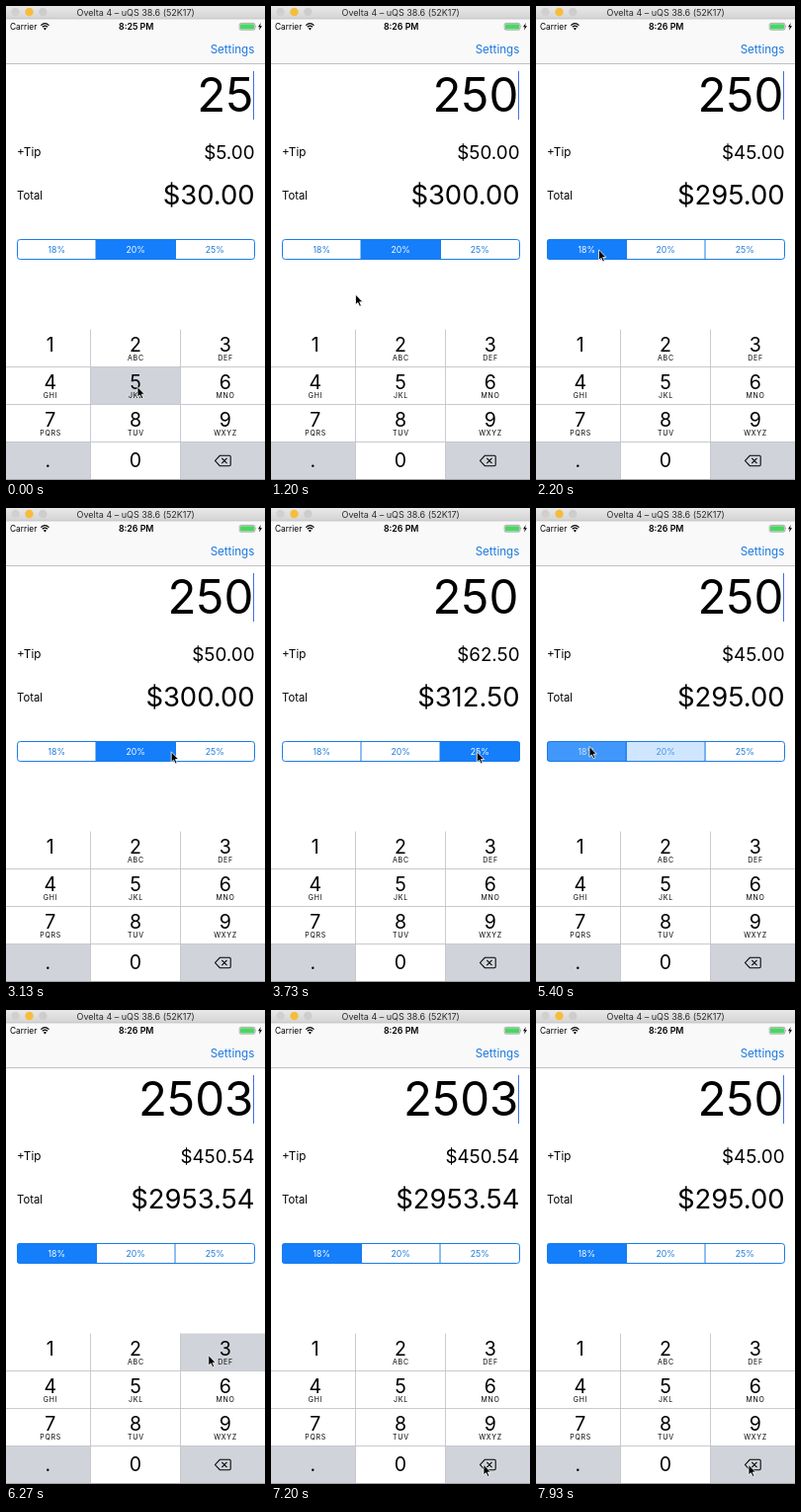
Recreate the animation shown at these times as an HTML page. Size 262 by 480 pixels, loop 8000 ms.

```html
<!DOCTYPE html>
<html lang="en">
<head>
<meta charset="utf-8">
<title>Tip calculator</title>
<style>
  html, body { margin: 0; width: 100%; height: 100%; overflow: hidden; background: #fff; }
  svg { display: block; width: 100vw; height: 100vh; font-family: Inter, "Open Sans", sans-serif; }
  .blue { fill: #1a78dc; }
  .mid { text-anchor: middle; }
  .end { text-anchor: end; }
  .digit { font-size: 19.5px; }
  .letters { font-size: 7px; letter-spacing: .75px; }
  .segment { font-size: 8.7px; }
  .rule { stroke: #c2c5ca; stroke-width: .9; fill: none; }
</style>
</head>
<body>
<svg id="stage" viewBox="0 0 262 480">
  <defs>
    <linearGradient id="chrome" x2="0" y2="1">
      <stop stop-color="#e9e9e9"/><stop offset="1" stop-color="#d3d3d3"/>
    </linearGradient>
    <clipPath id="pill"><rect x="11" y="236" width="241" height="21" rx="3.2"/></clipPath>
  </defs>
  <rect width="262" height="480" fill="#fff"/>

  <!-- window bar -->
  <rect y="13" width="262" height="45" fill="#f9f9fa"/>
  <path d="M0 58.5H262" stroke="#b9b9bb" stroke-width=".9"/>
  <rect width="262" height="13" fill="url(#chrome)"/>
  <path d="M0 13H262" stroke="#bcbcbc" stroke-width=".7"/>
  <circle cx="9.5" cy="6" r="4.2" fill="#d2cfcf"/>
  <circle cx="23.5" cy="6" r="4.2" fill="#f6bd3b"/>
  <circle cx="37.3" cy="6" r="4.2" fill="#cdcdcd"/>
  <text class="mid" x="131.2" y="9.6" font-size="9" fill="#2a2a2a">Ovelta 4 – uQS 38.6 (52K17)</text>

  <!-- status bar -->
  <text x="4" y="23.8" font-size="8.4">Carrier</text>
  <g fill="none" stroke="#000" stroke-width="1.2">
    <path d="M35.3 19.6Q39.4 15.8 43.5 19.6M36.8 21.3Q39.4 18.9 42 21.3"/>
  </g>
  <path d="M37.9 22.7Q39.4 21.3 40.9 22.7L39.4 24.4Z"/>
  <text id="clock" class="mid" x="131.7" y="24" font-size="8.8" font-weight="600"></text>
  <rect x="236.2" y="17.4" width="15.6" height="6.8" rx="1.4" fill="none" stroke="#777" stroke-width=".6"/>
  <rect x="237" y="18.2" width="14" height="5.2" rx=".7" fill="#4cd564"/>
  <path d="M252.6 19.6Q253.8 20.8 252.6 22Z" fill="#777"/>
  <path d="M257.8 17L255 21.3H256.8L256 24.6L259 20.2H257.1Z"/>
  <text class="blue end" x="251.3" y="47.6" font-size="11.6">Settings</text>

  <!-- bill -->
  <text id="amount" class="end" x="250.3" y="107" font-size="47.4"></text>
  <rect id="caret" x="250" y="66" width="1" height="49" fill="#3f6fe0"/>
  <text x="11" y="152.1" font-size="11.7">+Tip</text>
  <text id="tip" class="end" x="251.5" y="154.7" font-size="18.8"></text>
  <text x="11" y="195.6" font-size="11.3">Total</text>
  <text id="total" class="end" x="251.5" y="201.3" font-size="27.4"></text>

  <g id="segments"></g>
  <g id="keypad"></g>
  <path d="M0 479.5H262" stroke="#a6a6a6"/>

  <path id="pointer" d="M0 0V10.6L2.4 8.4L4.1 12.2L5.9 11.4L4.2 7.7H7.4Z" stroke="#fff" stroke-width=".8"/>
</svg>
<script>
const LOOP = 8000, FADE = 250, KEY_H = 38, KEY_TOP = 327.5;
const RATES = [18, 20, 25];
const $ = id => document.getElementById(id);

// [start, value]: each value holds until the next start
const amounts = [[0, 25], [680, 250], [6130, 2503], [7420, 250]];
const picks = [[-1000, 1], [1790, 0], [2800, 1], [3440, 2], [4440, 1], [5200, 0]];
const presses = [[0, 110, '5'], [680, 830, '0'], [6130, 6400, '3'], [7420, 7560, 'del']];
// [time, x, y]
const route = [
  [0, 133, 385.5], [150, 133, 385.5], [560, 130.5, 455], [900, 130.5, 455],
  [1200, 85.5, 292], [1320, 85.5, 292], [1650, 63.5, 246.8], [2350, 63.5, 246.8],
  [2700, 131.5, 246.8], [2950, 131.5, 246.8], [3330, 208.3, 246.8], [3900, 208.3, 246.8],
  [4300, 131.5, 244], [4700, 131.5, 244], [5080, 54, 241.5], [5520, 54, 241.5],
  [6050, 204.8, 349.5], [6480, 204.8, 349.5], [7100, 215, 460.3], [LOOP, 215, 460.3]
];

function buildSegments() {
  const x = i => 11 + 80 * i;
  const label = (i, fill) =>
    `<text class="segment mid" x="${x(i) + 40.2}" y="249.9" fill="${fill}">${RATES[i]}%</text>`;
  const cell = i => `${label(i, '#1a78dc')}<g id="seg${i}" clip-path="url(#pill)">
    <rect x="${x(i)}" y="236" width="81" height="21" fill="#147efb"/>${label(i, '#fff')}</g>`;
  $('segments').innerHTML = RATES.map((_, i) => cell(i)).join('') +
    `<g fill="none" stroke="#1a7ce8">
      <rect x="11.5" y="236.5" width="240" height="20" rx="2.8"/>
      <path d="M91 236.5V256.5M171 236.5V256.5"/></g>`;
}

function buildKeypad() {
  const names = ['1', '2', '3', '4', '5', '6', '7', '8', '9', '.', '0', 'del'];
  const letters = ['', 'ABC', 'DEF', 'GHI', 'JKL', 'MNO', 'PQRS', 'TUV', 'WXYZ', '', '', ''];
  const edges = [0, 85.5, 176.5, 262], centers = [44.7, 131, 221.7];
  let html = '';
  names.forEach((name, i) => {
    const col = i % 3, top = KEY_TOP + KEY_H * Math.floor(i / 3), cx = centers[col];
    html += `<rect id="key-${name}" x="${edges[col]}" y="${top}"
      width="${edges[col + 1] - edges[col]}" height="${KEY_H}"/>`;
    if (name === 'del') {
      html += `<g fill="none" stroke="#000" stroke-width="1.05">
        <path d="M216.3 455.3H226Q227.2 455.3 227.2 456.5V464.5Q227.2 465.7 226 465.7H216.3L211.5 460.5Z"/>
        <path d="M218.3 457.8L223.5 463.2M223.5 457.8L218.3 463.2"/></g>`;
    } else {
      const x = name === '.' ? 42.3 : cx, y = top + (letters[i] || name === '1' ? 22 : 25.7);
      html += `<text class="digit mid" x="${x}" y="${y}">${name}</text>
        <text class="letters mid" x="${cx + .4}" y="${top + 31.7}">${letters[i]}</text>`;
    }
  });
  const rows = [1, 2, 3].map(n => `M0 ${KEY_TOP + KEY_H * n}H262`).join('');
  const columns = edges.slice(1, 3).map(x => `M${x} ${KEY_TOP}V480`).join('');
  $('keypad').innerHTML = `${html}<path class="rule" d="${rows}${columns}"/>`;
}

const indexAt = (list, t) => list.findLastIndex(([start]) => start <= t);
const money = value => '$' + value.toFixed(2);

function placePointer(t) {
  const i = Math.min(indexAt(route, t), route.length - 2);
  const [t0, x0, y0] = route[i], [t1, x1, y1] = route[i + 1];
  const p = (t - t0) / (t1 - t0), e = p * p * (3 - 2 * p);
  $('pointer').setAttribute('transform',
    `translate(${x0 + (x1 - x0) * e} ${y0 + (y1 - y0) * e})`);
}

function drawSegments(t) {
  const now = indexAt(picks, t), [start, chosen] = picks[now];
  const previous = now ? picks[now - 1][1] : chosen;
  const p = Math.min(1, (t - start) / FADE);
  RATES.forEach((_, i) => {
    $('seg' + i).style.opacity = i === chosen ? p : i === previous ? 1 - p : 0;
  });
  return RATES[chosen];
}

function drawKeys(t) {
  for (const key of $('keypad').querySelectorAll('rect')) {
    const name = key.id.slice(4);
    const down = presses.some(([a, b, k]) => k === name && t >= a && t < b);
    const gray = name === '.' || name === 'del';
    key.setAttribute('fill', down !== gray ? '#d0d4da' : '#fff');
  }
}

function draw(t) {
  const [typed, amount] = amounts[indexAt(amounts, t)];
  const tip = amount * drawSegments(t) / 100;
  $('amount').textContent = amount;
  $('tip').textContent = money(tip);
  $('total').textContent = money(amount + tip);
  $('clock').textContent = t < 600 ? '8:25 PM' : '8:26 PM';
  const blink = t % 1000;
  $('caret').style.opacity = t - typed > 600 && blink > 600 && blink < 950 ? 0 : 1;
  drawKeys(t);
  placePointer(t);
}

function tick() {
  draw(performance.now() % LOOP);
  requestAnimationFrame(tick);
}

buildSegments();
buildKeypad();
tick();
</script>
</body>
</html>
```
